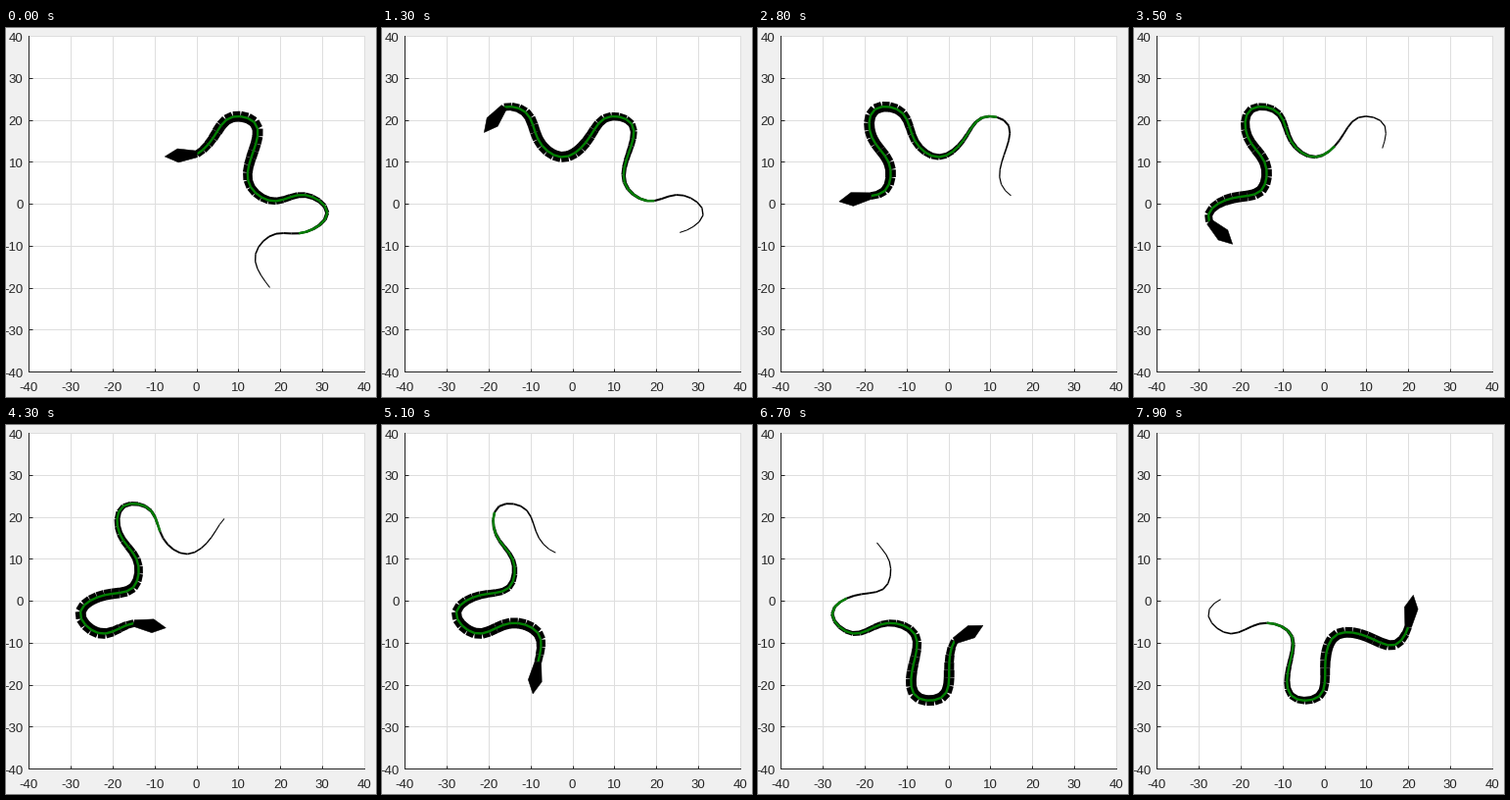
A matplotlib script that plays this animation: 378x376 px, repeating every 8000 ms.

```python
import numpy as np
import matplotlib.pyplot as plt
from matplotlib.animation import FuncAnimation
from matplotlib.collections import LineCollection
from matplotlib.patches import Polygon

W, H, DPI = 378, 376, 64
PX = 72 / DPI                      # points per pixel
UNIT = 343 / 80                    # pixels per data unit
FRAMES, INTERVAL = 80, 100
SEGMENTS, BARE = 48, 12            # BARE tail segments have no green core
LENGTH, SPEED, LAG = 86.4, 1.8, 1.2
INK, GREEN, AXIS, GRID = "black", (0, 0.5, 0), "#262626", "#dedede"

# Bends of the winding track, tail first
BENDS = np.array([
    (17.5, -20), (14.1, -12), (18.5, -7.3), (25, -7), (31.2, -2),
    (25.5, 2.1), (18.5, .6), (12.7, 4.4), (13.4, 12), (14, 19.2),
    (8.3, 20.6), (4, 15.7), (-2.4, 11.1), (-8, 15), (-11.4, 22),
    (-17.6, 22.4), (-18.3, 16), (-14, 9.2), (-15, 3.2), (-22, 1.3),
    (-27.7, -3.2), (-23, -7.8), (-15, -5.4), (-8, -8), (-8.5, -16),
    (-7.5, -23), (-1.5, -23), (.2, -15), (2.6, -8.3), (10, -8.5),
    (17, -10.5), (20.2, -5.5), (20.7, -1.5),
])


def lengths(p):
    """Running length along a chain of points."""
    return np.r_[0, np.cumsum(np.hypot(*np.diff(p, axis=0).T))]


def spline(p, count=5000):
    """Natural cubic spline through p, sampled densely."""
    c = lengths(p)
    h = np.diff(c)
    n = len(p)
    m = np.eye(n)
    rhs = np.zeros_like(p)
    for i in range(1, n - 1):
        m[i, i - 1:i + 2] = h[i - 1], 2 * (h[i - 1] + h[i]), h[i]
        rhs[i] = 6 * ((p[i + 1] - p[i]) / h[i] - (p[i] - p[i - 1]) / h[i - 1])
    bend = np.linalg.solve(m, rhs)
    t = np.linspace(0, c[-1], count)
    i = np.clip(np.searchsorted(c, t) - 1, 0, n - 2)
    d = h[i][:, None]
    b = (t - c[i])[:, None] / d
    a = 1 - b
    return (a * p[i] + b * p[i + 1]
            + ((a**3 - a) * bend[i] + (b**3 - b) * bend[i + 1]) * d * d / 6)


track = spline(BENDS)
arc = lengths(track)


def track_at(s):
    return np.column_stack([np.interp(s, arc, q) for q in track.T])


order = np.arange(SEGMENTS)
body_w = np.interp(order, [0, BARE, 33, 43, SEGMENTS], [1, 2.2, 10.8, 10.8, 7])

fig = plt.figure(figsize=(W / DPI, H / DPI), dpi=DPI, facecolor="#f0f0f0")
ax = fig.add_axes([23 / W, 26 / H, 343 / W, 342 / H])
ticks = np.arange(-40, 41, 10)
ax.set(xlim=(-40, 40), ylim=(-40, 40), xticks=ticks, yticks=ticks)
ax.set_axisbelow(True)
ax.grid(color=GRID, lw=PX)
ax.tick_params(direction="in", length=3.5 * PX, width=PX, color=AXIS,
               labelbottom=False, labelleft=False)
for side, spine in ax.spines.items():
    on_axis = side in ("left", "bottom")
    spine.set(color=AXIS if on_axis else GRID, linewidth=PX,
              zorder=2.5 if on_axis else 0.6)


def label(x, y, value, ha):
    fig.text(x / W, 1 - y / H, str(value), ha=ha, va="baseline",
             family="Liberation Sans", size=13.3 * PX, color=AXIS)


for v in ticks:
    label(194.5 + v * UNIT, 370.5, v, "center")
    label(17.5, 184.5 - v * 4.275, v, "right")


def strokes(color, widths, z):
    lines = LineCollection([], colors=[color], linewidths=widths * PX,
                           capstyle="butt", zorder=z)
    ax.add_collection(lines, autolim=False)
    return lines


body = strokes(INK, body_w, 3)
core = strokes(GREEN, np.full(SEGMENTS - BARE, 2.4), 4)
head = ax.add_patch(Polygon(np.zeros((5, 2)), closed=True, fc=INK, ec=INK,
                            lw=.5 * PX, zorder=5))
HEAD = np.array([(0, -3.3), (19.5, -7), (33, 0), (19.5, 7), (0, 3.3)]) / UNIT


def draw(n):
    # Steady crawl that lags slightly midway
    tail = SPEED * n - LAG * np.sin(np.pi * n / (FRAMES - 1))
    pts = track_at(tail + np.linspace(0, LENGTH, SEGMENTS + 1))
    segs = np.stack([pts[:-1], pts[1:]], axis=1)
    body.set_segments(segs)
    core.set_segments(segs[BARE:])
    neck = pts[-1]
    u = track_at([tail + LENGTH + 4.5])[0] - neck
    u /= np.hypot(*u)
    head.set_xy(neck + HEAD @ np.array([u, (-u[1], u[0])]))
    return body, core, head


anim = FuncAnimation(fig, draw, frames=FRAMES, interval=INTERVAL,
                     repeat=True, repeat_delay=0, blit=False)
plt.show()
```
